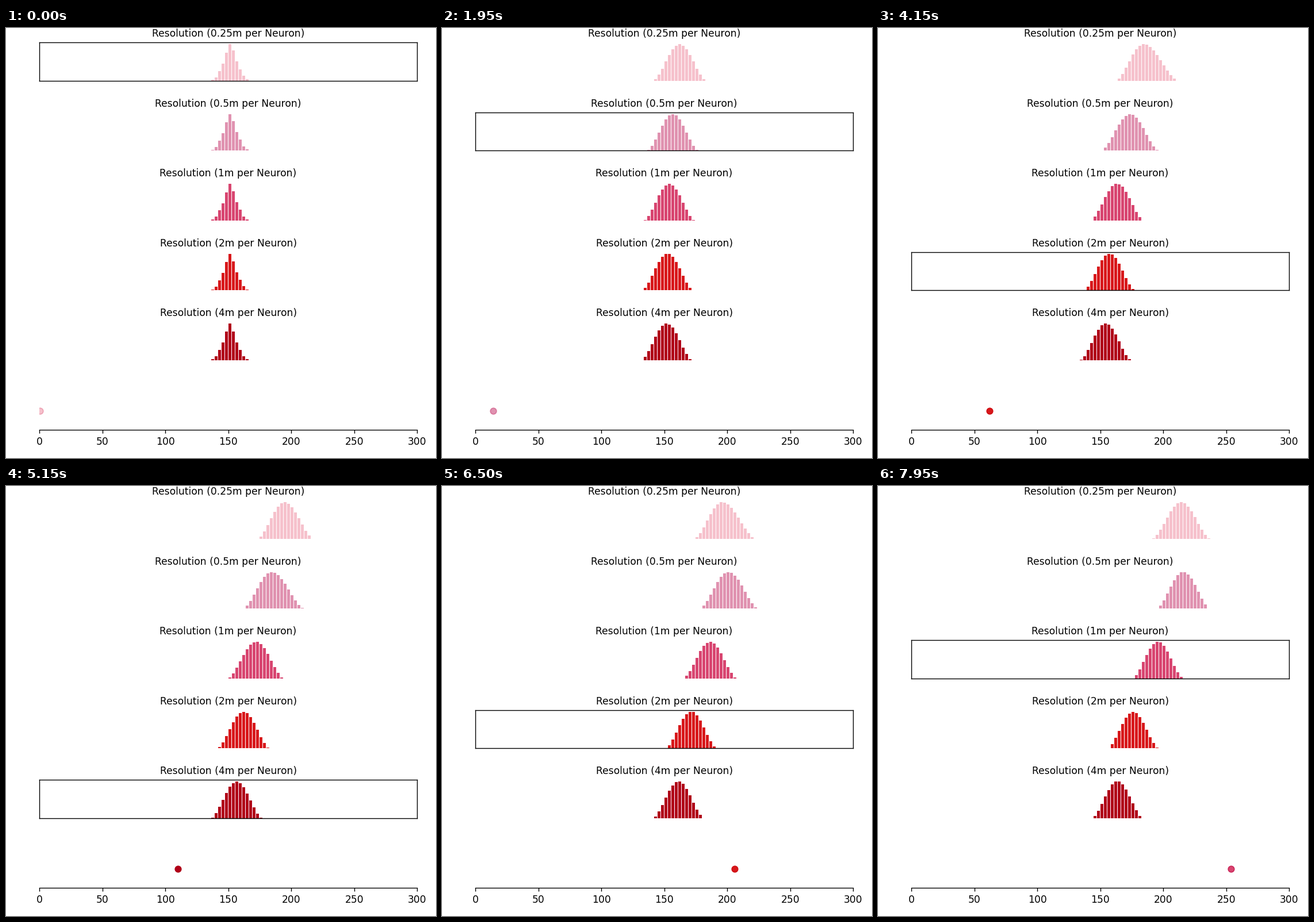
Write a matplotlib script that moves like this. It is 748 px wide and 748 px high and loops after 8000 ms.

```python
import numpy as np
import matplotlib.pyplot as plt
from matplotlib.animation import FuncAnimation

SIZE, DPI = 748, 125
FRAMES, STEP_MS, HOLD = 160, 50, 25
CELLS = 100
LEFT, WIDTH = 58.1, 657
TOP, HEIGHT, PITCH = 25.1, 66.7, 121.5
FONT = 9.9

RES = [0.25, 0.5, 1, 2, 4]
FILL = ["#f6c1cc", "#e092b0", "#d84570", "#d8181b", "#b00018"]
EDGE = ["#eda3b5", "#d8769c", "#cc2a5c", "#d01015", "#b00018"]

# The speed climbs through the resolutions and comes back down.
LEVELS = np.array([0, 1, 2, 3, 4, 3, 2])[np.arange(FRAMES) // HOLD]
SPEED = np.array(RES)[LEVELS]
POSITION = SPEED[0] + np.cumsum(SPEED)

# Response of the bump to its drive (speed / resolution).
DRIVE = [0, 1, 2, 4, 8, 16]
RATE = [0, 1 / 14, 1 / 7, 0.21, 0.217, -0.025]
TAIL = [3.95, 3.97, 4.13, 4.53, 4.35, 4.1]
FRONT = [3.95, 3.97, 4.13, 4.42, 5.4, 4.1]
FLOOR = 0.029
SETTLE = 3.3


def smooth(values, tau):
    out = np.array(values, float)
    for k in range(1, len(out)):
        out[k] = out[k - 1] + (values[k] - out[k - 1]) * (1 - np.exp(-1 / tau))
    return out


def bump_track(res):
    """Centre and the two half widths of one bump, per frame."""
    drive = SPEED / res
    rate = np.interp(drive, DRIVE, RATE)
    centre = CELLS / 2 + rate[0] + np.cumsum(rate)
    tail = smooth(np.interp(drive, DRIVE, TAIL), SETTLE)
    front = smooth(np.interp(drive, DRIVE, FRONT), SETTLE)
    return centre, tail, front


def bump(k, track):
    """Normalised activity of all cells."""
    centre, tail, front = (part[k] for part in track)
    x = np.arange(CELLS) - centre - (tail - front) / 2
    reach = np.where(x < 0, tail, front) / 0.491
    wide = np.cos(np.pi / 2 * np.clip(x / reach, -1, 1)) ** 2
    wide = np.clip((wide - FLOOR) / (1 - FLOOR), 0, None)
    narrow = np.interp(np.abs(x), range(7), [1, 0.78, 0.48, 0.28, 0.105, 0.025, 0])
    mix = np.exp(-k / SETTLE)
    y = mix * narrow + (1 - mix) * wide
    return y / y.max()


TRACKS = [bump_track(res) for res in RES]

fig = plt.figure(figsize=(SIZE / DPI, SIZE / DPI), dpi=DPI, facecolor="white")


def add_row(row):
    bottom = SIZE - (TOP + row * PITCH + HEIGHT)
    ax = fig.add_axes([LEFT / SIZE, bottom / SIZE, WIDTH / SIZE, HEIGHT / SIZE])
    ax.set_yticks([])
    return ax


panels, bars = [], []
for row, res in enumerate(RES):
    ax = add_row(row)
    ax.set_xticks([])
    ax.set_title(f"Resolution ({res}m per Neuron)", fontsize=FONT, pad=5.8, y=1.0)
    bars.append(ax.bar(range(CELLS), np.zeros(CELLS), color=FILL[row]))
    margin = 0.05 * (CELLS - 0.2)
    ax.set_xlim(-0.4 - margin, CELLS - 0.6 + margin)
    ax.set_ylim(0, 1.05)
    panels.append(ax)

road = add_row(len(RES))
road.set_xlim(0, 300)
road.set_ylim(-1, 1)
road.tick_params(labelsize=FONT)
for side in ("left", "right", "top"):
    road.spines[side].set_visible(False)
dot = road.scatter([0], [0], s=36, linewidths=1)


def draw(k):
    level = LEVELS[k]
    for row, ax in enumerate(panels):
        for spine in ax.spines.values():
            spine.set_visible(row == level)
        for bar, height in zip(bars[row], bump(k, TRACKS[row])):
            bar.set_height(height)
            bar.set_visible(height > 0.004)
    dot.set_offsets([[POSITION[k], 0]])
    dot.set_facecolor(FILL[level])
    dot.set_edgecolor(EDGE[level])
    return []


anim = FuncAnimation(fig, draw, frames=FRAMES, interval=STEP_MS,
                     init_func=lambda: draw(0), repeat=True, repeat_delay=0)
plt.show()
```
